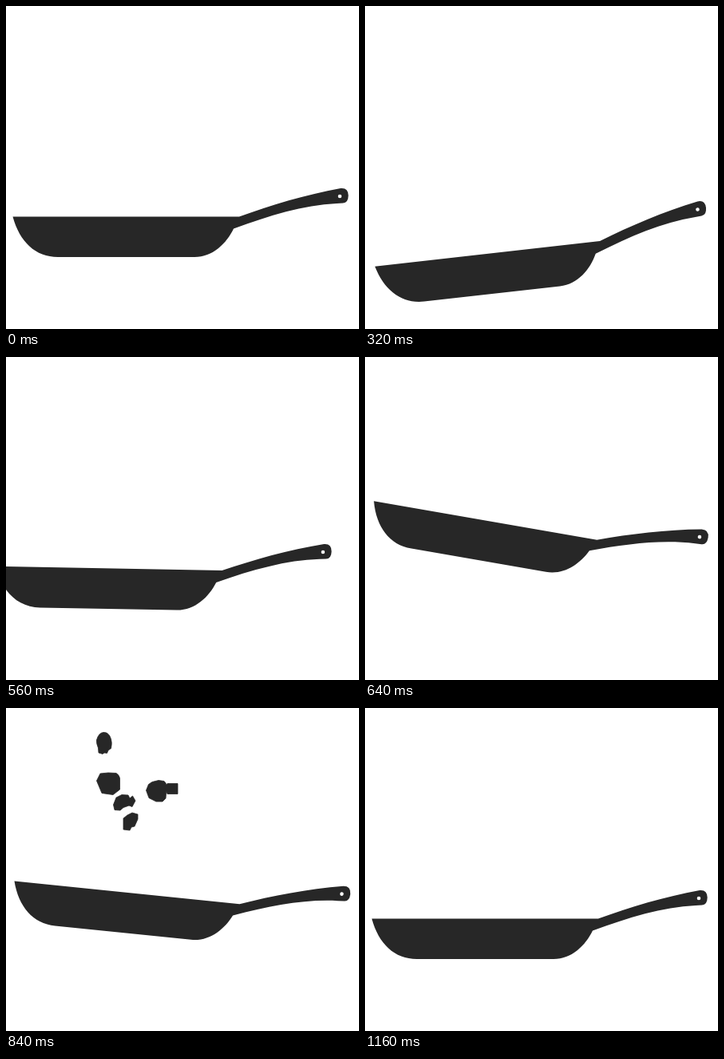
Write an HTML page that moves like this. It is 442x404 px and loops after 2.04 s.

```html
<!DOCTYPE html>
<html lang="en">
<head>
<meta charset="utf-8">
<title>Frying pan toss</title>
<style>
  html, body { margin: 0; width: 100%; height: 100%; overflow: hidden; background: #fff; }
  svg { display: block; width: 442px; height: 404px; fill: #272727; }
  .food { stroke: #272727; stroke-width: .8; stroke-linejoin: round; }
</style>
</head>
<body>
<svg viewBox="0 0 442 404">
  <g class="food" id="food"></g>
  <g id="pan">
    <path d="M8.5 263.5H292C332 249 375 236 419 228Q428.5 227 428.7 237Q428.5 246.3 422 246.5L414 247C372 249 330 262 285 278.5C276 297 259 314 236 314H65C37 314 17 295 8.5 263.5Z"/>
    <circle cx="418" cy="238" r="2.3" fill="#fff"/>
  </g>
</svg>
<script>
const LOOP = 2040, STEP = 40;
const RIM = [150.75, 263.5];

// time, shift x, shift y, tilt around the middle of the rim
const POSES = [
  [80, 0, 0, 0],
  [200, .75, 26.5, -3.3],
  [440, 5.25, 66, -9.55],
  [480, 6.3, 72.3, -10.5],
  [560, -21.5, 1, 1.06],
  [640, .5, -59, 9.85],
  [720, 1.75, -50, 8.27],
  [840, 1.25, -32.5, 5.8],
  [1160, 0, 0, 0]
];

// Each piece flies through point a, then point b, 120 ms later.
const FLIGHT = { start: 680, a: 720, span: 120, end: 1160 };
const GRAVITY = .0031, DRAG = .0015, LANDING = 283;
const PIECES = [
  { a: [80, 102], b: [123, 44],
    d: "M-9.5-4Q-7-13-1-13.5Q6-14 8.5-5Q10 0 8.5 6.5L5 9L3.5 12.5L0 12L-2 13.5L-7 12L-7.5 6Q-10 0-9.5-4Z" },
  { a: [87, 122], b: [128, 95],
    d: "M-10-13L0-14L10-13.5Q14-11 14.5-7V7L6 13.5L-8 11.5L-14.5-4Z" },
  { a: [119, 117], b: [188, 104],
    d: "M-12.5-1L-9.5-8.5L-5-11.5L3-13.5L10-12.5Q14-9 13-4L12 9L8 13H0L-9 8.5Z" },
  { a: [136, 111], b: [208.5, 101],
    d: "M-6.5-6.5H6.5V6.5H-6.5L-10-2Z" },
  { a: [124, 143], b: [156, 142],
    from: [-9, -8, -3, -11, 2, -7, 9, -4, 8, 3, 7, 8, 3, 10, -7, 9, -9, 4],
    to: [-9, -4, -4, -8, 2, -11, 9, -9, 9, -3, 5, 6, 1, 7, -1, 11, -9, 10] },
  { a: [92, 120], b: [148, 118],
    d: "M-13.5 3L-10-6L-3-9.5L5-9L7-5L10.5-8L14-2L10 5.5L6 4L-1 6.5L-5 10L-12 9.5Z" }
];

const mix = (a, b, k) => a + (b - a) * k;
const clamp = (v, lo, hi) => Math.min(hi, Math.max(lo, v));
const pan = document.getElementById("pan");
const food = document.getElementById("food");

for (const p of PIECES) {
  p.el = document.createElementNS("http://www.w3.org/2000/svg", "path");
  if (p.d) p.el.setAttribute("d", p.d);
  food.append(p.el);
}

function poseAt(t) {
  t = clamp(t, POSES[0][0], POSES[POSES.length - 1][0]);
  const i = POSES.findIndex(p => p[0] >= t) || 1;
  const a = POSES[i - 1], b = POSES[i];
  const k = (t - a[0]) / (b[0] - a[0]);
  return [1, 2, 3].map(n => mix(a[n], b[n], k));
}

function drawPiece(p, t) {
  const u = t - FLIGHT.a, bend = u * (u - FLIGHT.span);
  const x = mix(p.a[0], p.b[0], (u - DRAG * bend) / FLIGHT.span);
  const y = mix(p.a[1], p.b[1], u / FLIGHT.span) + GRAVITY * bend;
  const flying = t >= FLIGHT.start && t < FLIGHT.end && y < LANDING;
  p.el.setAttribute("visibility", flying ? "visible" : "hidden");
  p.el.setAttribute("transform", `translate(${x} ${y})`);
  if (p.from) {
    const k = clamp(u / FLIGHT.span, 0, 1);
    p.el.setAttribute("d", "M" + p.from.map((v, i) => mix(v, p.to[i], k)).join(" ") + "Z");
  }
}

function draw(t) {
  const [x, y, tilt] = poseAt(t);
  pan.setAttribute("transform", `translate(${x} ${y}) rotate(${tilt} ${RIM})`);
  for (const p of PIECES) drawPiece(p, t);
}

const begin = performance.now();
function tick() {
  const t = (performance.now() - begin) % LOOP;
  draw(Math.floor(t / STEP) * STEP);
  requestAnimationFrame(tick);
}
tick();
</script>
</body>
</html>
```
